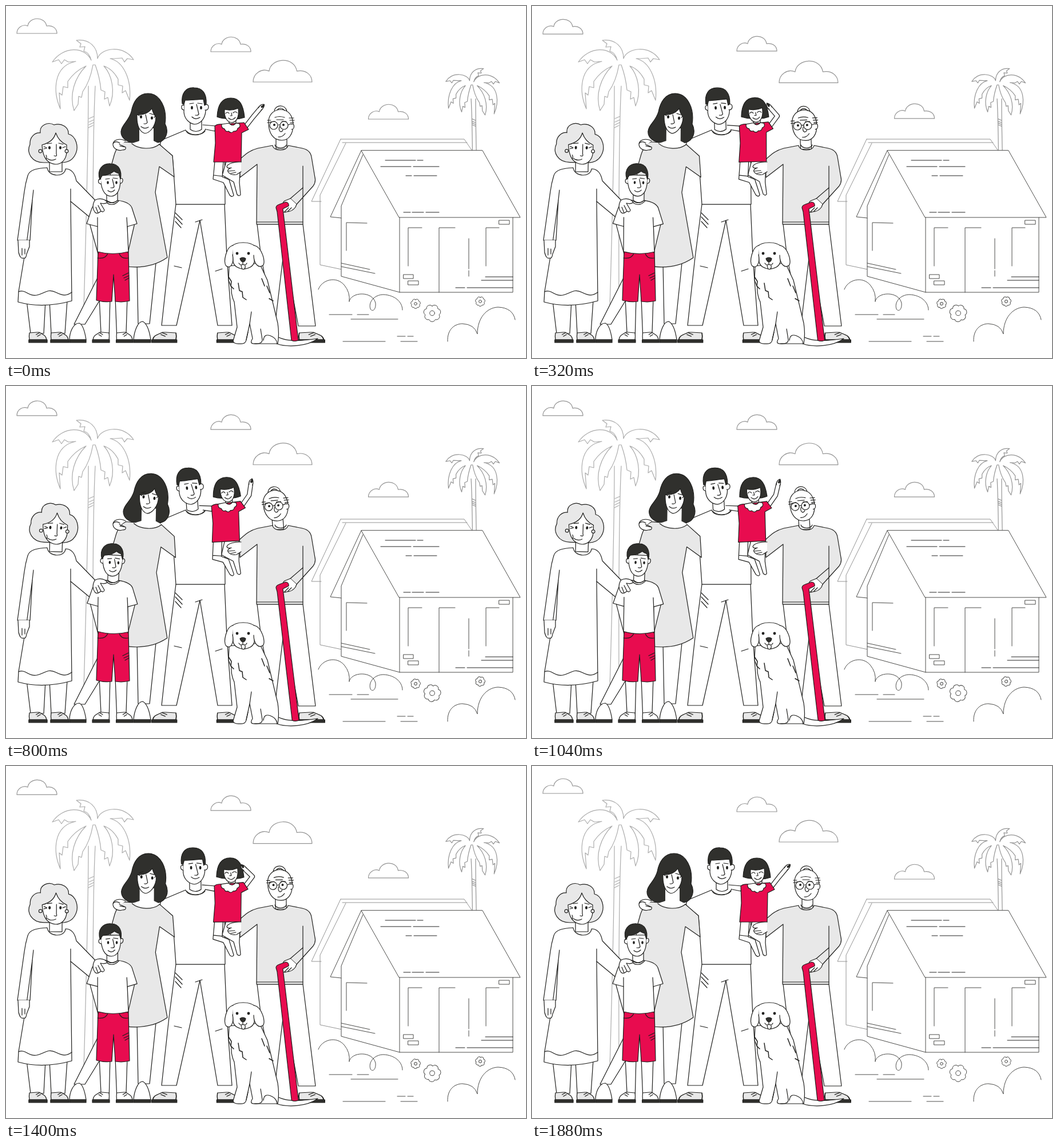
Animation, 909 px wide and 616 px high, one loop 1920 ms. Source, as an HTML page:

```html
<!DOCTYPE html>
<html lang="en">
<head>
<meta charset="utf-8">
<title>Family</title>
<style>
html, body { margin: 0; width: 100%; height: 100%; overflow: hidden; background: #fff; }
svg { display: block; width: 100%; height: 100%; fill: none; stroke: #1f1f1d; stroke-width: 1.2; stroke-linejoin: round; stroke-linecap: round; }
.pale { stroke: #acacac; }
.haze { stroke: #949494; }
.mid { stroke: #4c4c4a; stroke-width: 1; }
.w { fill: #fff; }
.g { fill: #e8e8e8; }
.d { fill: #30302d; }
.r { fill: #e80c4f; }
.dot { fill: #1f1f1d; stroke: none; }
</style>
</head>
<body>
<svg viewBox="0 0 909 616">
<defs>
  <path id="cloud" vector-effect="non-scaling-stroke" d="M0 0C0-10 10-17 19-13C21-29 49-31 52-13C62-15 70-9 70 0Z"/>
  <g id="palm">
    <path vector-effect="non-scaling-stroke" d="M144 140Q144 250 136 528M156 140Q151 230 152 520M145 197L154 193M145 203L154 199M145 208L153 204M144 213L152 209"/>
    <path class="w" vector-effect="non-scaling-stroke" d="M123 60C146 57 160 72 160 92C165 74 205 66 223 94L212 92L207 98L203 91L190 92L182 92C205 97 220 128 216 165L209 148L203 152L204 140L196 138L196 128C189 115 180 108 171 105C185 120 192 150 181 175L178 160L172 163L173 150L166 147Q164 125 156 103L152 103Q147 132 134 150L132 160L127 158L126 172L119 183C110 155 120 125 140 105Q120 114 108 132L108 143L100 141L98 156L93 152L95 180C82 150 82 105 122 97L109 98L102 94L97 101L92 94L81 98C100 70 138 70 149 95Q146 82 136 79L138 71L129 72L131 66Z"/>
  </g>
  <g id="shoe">
    <path d="M1 24C2 16 7 15 13 11L17 11L29 12Q30 18 29 24Z"/>
    <path class="d" d="M0 24H30V29H0Z"/>
    <path d="M13 12L18 15M11 15L16 18"/>
  </g>
</defs>

<use href="#palm" class="pale"/>
<use href="#palm" class="haze" transform="translate(916 70) scale(-.66 .66)"/>
<g id="clouds" class="haze"></g>

<g class="mid">
  <path class="w haze" d="M585 233H801L816 255M585 233L534 342H551M594 240L549 331V453L587 461M588 239H806"/>
  <path class="w" d="M621 253L567 369L586 371V473L688 501H886V370H899L833 253Z"/>
  <path d="M621 253L687 370H886M688 370V501M624 260L586 350V371M757 501V388H785M809 407V460M809 463V473M839 455V388H862M703 455V388H727M595 428V379L631 380M586 450L636 461M586 456L645 468"/>
  <path d="M862 375h18v7h-18ZM695 470h17v7h-17ZM703 481h18v7h-18Z"/>
  <path stroke="#222" d="M663 270H716M719 270H729M655 281H708M712 281H757M699 297H709M713 297H753M695 361H707M710 361H730M734 361H757M838 474H886M831 480H886M786 493H802M806 493H886"/>
  <path d="M565 540H605M614 540H634M603 548H685M589 587H663M684 578H698M702 578H712M690 587H719"/>
  <path d="M546 496C552 479 577 472 591 488Q602 501 600 517M600 517C603 500 641 498 646 520C647 532 640 536 637 530C633 518 644 505 660 505C680 506 693 518 693 532M772 587C771 565 785 556 798 556Q819 557 824 574C824 546 840 528 860 527Q886 528 890 549"/>
  <g id="flowers"></g>
</g>

<!-- grandfather -->
<path class="w" d="M439 382L446 440L470 560L486 425L511 560H541L519 382Z"/>
<use href="#shoe" class="g" transform="translate(557 560) scale(-1.53 1)"/>
<g id="oldHead">
  <path class="w" d="M472 226V250H491V226"/>
  <path class="w" d="M459 205C458 191 467 182 480 181C494 182 501 191 502 207C502 225 494 235 482 235C467 235 459 222 459 205ZM469 183C472 172 488 172 491 184M474 182Q480 175 487 183"/>
  <path class="w" d="M499 207C505 204 505 216 499 216"/>
  <path d="M470 195Q478 192 487 195M473 199H485M495 196H503M496 200H504M497 204H503M457 200H463M457 204H462M476 208L479 208M493 208L499 206M478 211Q476 218 480 220Q483 220 484 217M476 229Q483 230 488 223M462 203L470 202M482 202L490 202"/>
  <circle cx="468" cy="209" r="7"/><circle cx="486" cy="209" r="7"/>
  <circle class="dot" cx="469" cy="208" r="2"/><circle class="dot" cx="485" cy="208" r="2"/>
</g>
<path class="g" d="M466 244L440 249C425 253 418 260 408 269L409 300L439 277L438 382H519V318L497 337L508 347L537 315Q542 308 540 300L534 264Q532 252 518 249L493 244C491 255 468 255 466 244Z"/>
<path d="M438 378H519M519 280V318M470 243C472 250 488 250 490 243"/>

<!-- father -->
<path class="w" d="M297 347L285 440L272 559H298L339 375L370 559H395L386 440L382 347Z"/>
<path d="M331 378L343 374M296 362L308 374M296 369L308 382M296 377L306 388M294 455L307 458M366 464L378 460"/>
<use href="#shoe" class="g" transform="translate(255 560) scale(1.45 1)"/>
<use href="#shoe" class="g" transform="translate(406 560) scale(-1.25 1)"/>
<path class="w" d="M314 217L276 233Q268 237 270 245L291 262L297 347H383L382 222Q370 216 349 215C344 229 318 229 314 217Z"/>
<g id="dadHead">
  <path class="w" d="M322 200V216Q332 223 342 216V200"/>
  <path class="w" d="M311 164V186C312 199 322 206 330 207C341 206 348 196 349 184V163Z"/>
  <path class="w" d="M348 173C356 169 356 184 348 182M311 174C306 171 305 181 311 182"/>
  <path class="d" d="M308 171C306 153 314 142 329 143C344 143 351 154 350 171L347 174L345 163C333 164 320 165 313 165L311 172Z"/>
  <path d="M321 171L328 170M335 170L343 171M333 172L337 189Q336 192 331 191M325 194Q331 200 339 195"/>
  <ellipse class="dot" cx="325" cy="178" rx="1.9" ry="3"/><ellipse class="dot" cx="341" cy="178" rx="1.9" ry="3"/>
</g>
<path d="M316 219C322 227 342 227 348 219"/>

<!-- mother -->
<path class="w" d="M163 470L119 557H138L170 505M229 450L231 556H251L262 450"/>
<g class="w">
  <path d="M111 584C111 572 117 555 128 555Q136 558 140 584ZM223 584C224 570 230 552 239 552Q249 557 253 584Z"/>
  <path class="d" d="M111 584H140V589H111ZM223 584H253V589H223Z"/>
</g>
<g id="mom">
  <path class="g" d="M206 238Q193 244 188 265L181 290L192 330L197 380L190 452Q245 466 282 440L261 326L268 281L294 299L291 262L268 242Z"/>
  <path class="d" d="M248 153C231 153 222 168 219 185C214 203 202 207 201 220C201 231 210 237 220 239H266C281 235 285 219 278 206C282 180 270 153 248 153Z"/>
  <path class="w" stroke="none" d="M233 214V236Q225 239 220 240C232 251 256 252 268 241L258 236V214Z"/>
  <path d="M220 241C232 251 256 252 268 242"/>
  <path class="w" d="M229 190C240 191 250 187 255 179Q257 188 262 194C262 211 251 222 243 223C234 221 228 209 229 190Z"/>
  <path d="M232 187L239 185M251 188L258 190M244 190L247 204Q245 207 241 206M236 211Q242 216 249 212M233 192L230 190M259 195L261 193"/>
  <ellipse class="dot" cx="236" cy="194" rx="2" ry="2.8"/><ellipse class="dot" cx="255" cy="196" rx="2" ry="2.8"/>
</g>
<path class="w" d="M209 236C198 230 186 235 187 243C188 250 196 254 203 252Q211 252 209 247L199 245M209 247L198 242M187 241Q191 235 199 240"/>

<!-- grandmother -->
<path class="w" d="M36 515L43 573H66L69 515M76 515L79 573H103L107 515"/>
<use href="#shoe" class="g" transform="translate(72 560) scale(-1.07 1)"/>
<use href="#shoe" class="g" transform="translate(110 560) scale(-1.07 1)"/>
<g id="granHead">
  <path class="g" d="M60 222C58 208 74 202 84 208C97 204 110 212 109 224C122 227 129 247 120 262Q113 274 97 274H66C45 274 35 257 42 242C41 230 50 221 60 222Z"/>
  <path class="w" d="M76 262V290H98V262"/>
  <path class="w" d="M63 243C75 240 84 234 87 222C91 234 99 240 106 243V256C105 271 95 277 87 277C74 276 64 267 63 243Z"/>
  <circle class="w" cx="60" cy="254" r="2.8"/><circle class="w" cx="106" cy="254" r="2.8"/>
  <path d="M72 241L80 240M92 240L100 242M88 242V259Q90 264 84 262M72 267Q79 272 87 268M66 246L71 248M66 250L71 249M99 248L104 246M70 261Q72 265 70 268"/>
  <ellipse class="dot" cx="76" cy="248" rx="2" ry="2.8"/><ellipse class="dot" cx="95" cy="248" rx="2" ry="2.8"/>
</g>
<path class="w" d="M72 283C55 284 41 286 38 297Q34 310 32 325L20 410H42L46 340L36 415L22 500L21 518Q65 530 115 516L113 342L148 371L156 340L123 306Q119 285 104 285C103 300 74 300 72 283Z"/>
<path d="M46 340L48 322M113 342V320M22 500C34 495 40 509 54 506S73 494 87 501S106 507 115 501"/>
<path class="w" d="M21 410L22 431Q25 443 30 441Q35 443 36 434L41 421V410M28 424V436M33 425V434"/>

<!-- boy -->
<path class="w" d="M163 510L166 572L180 586L182 510M191 510L194 586L210 572L212 510"/>
<use href="#shoe" class="w" transform="translate(151 560)"/>
<use href="#shoe" class="w" transform="translate(222 560) scale(-.98 1)"/>
<path class="r" d="M161 429L158 515Q172 519 185 517L188 470L191 517Q204 519 216 516L214 429Z"/>
<path d="M160 441Q174 443 178 433M214 441Q201 443 198 433M204 472L214 467M206 476L215 472M208 480L215 476"/>
<g id="boy">
  <path class="w" d="M146 380L161 434L162 384M225 380L213 432L212 384"/>
  <path class="w" d="M174 340Q152 344 149 357L141 381L160 386V430Q187 437 214 430L212 386L229 381L220 353Q216 343 195 340Q185 349 174 340Z"/>
  <path d="M160 386V370M212 386L211 370M172 341Q185 354 197 341"/>
  <g id="boyHead">
    <path class="w" d="M176 325V340Q185 348 195 340V325"/>
    <path class="w" d="M165 296C165 320 172 333 184 333C196 332 201 318 200 296Z"/>
    <path class="w" d="M166 303C160 301 160 312 166 311M200 302C206 299 205 311 200 310"/>
    <path class="d" d="M164 304C158 286 169 275 183 276C198 276 203 290 200 303L197 293Q191 291 189 289Q180 296 168 297Z"/>
    <path d="M174 303L181 302M187 301L195 302M186 303L189 316Q188 319 183 318M178 323Q184 328 190 322"/>
    <ellipse class="dot" cx="178" cy="309" rx="1.8" ry="2.7"/><ellipse class="dot" cx="193" cy="309" rx="1.8" ry="2.7"/>
  </g>
</g>
<path class="w" d="M155 340C164 335 174 338 177 344Q172 347 165 345L172 357Q171 362 166 359L162 362Q157 364 155 360Q149 352 155 340M166 359L161 349M161 362L157 352"/>

<!-- girl -->
<g id="girl">
  <path class="w" d="M344 208L367 210L365 219L350 216"/>
  <path class="w" d="M378 296L398 308L404 330Q408 334 410 330L408 309L410 272H385Z"/>
  <path class="w" d="M365 272L362 303L380 309L391 331Q396 336 398 331L390 304L378 299L380 272ZM363 296L378 298"/>
  <path class="w" d="M390 200V207Q396 214 402 207V200"/>
  <path class="d" d="M369 194C370 171 378 161 393 161C409 161 415 174 417 195Q406 199 393 197Q380 198 369 194Z"/>
  <path class="w" d="M382 181Q394 184 406 179C408 196 402 204 394 204C386 203 381 194 382 181Z"/>
  <path d="M384 188Q387 184 390 188M397 187Q401 183 404 187M394 187L395 192L392 192M389 196Q395 202 401 195"/>
  <path id="armEdge" stroke-width="8.4"/>
  <path id="armSkin" stroke-width="6" style="stroke:#fff"/>
  <g id="hand"><path class="w" d="M-3 2C-4-3-3-7 1-9C4-5 4-1 3 2"/><path class="d" d="M-1-3L1-9L3-5L1-2Z"/></g>
  <path class="r" d="M379 207Q369 206 365 210L366 240L363 273H411L412 222L424 216L416 204Z"/>
  <path class="w" d="M377 207Q376 214 382 215Q384 221 389 219Q394 224 398 219Q404 220 405 214Q411 212 408 206L402 205Q396 212 390 205Z"/>
</g>
<path class="w" d="M411 273C400 272 387 276 386 281Q387 285 394 283Q386 286 388 290Q393 297 403 295L411 290M389 289L400 288M393 293L402 291"/>

<!-- dog -->
<path class="w" d="M472 577C490 590 525 585 545 582C525 597 490 597 473 591"/>
<path class="w" d="M390 455L389 480L394 492Q393 505 399 518L404 562L397 586Q398 592 409 591Q419 592 420 584L426 556L431 582Q425 591 434 591H475Q478 574 475 555L463 505L457 480L443 450Z"/>
<path stroke-width="1.5" d="M389 474L394 482L393 490L398 495M406 485L408 498L413 500L414 510L420 514M447 477L452 490M456 490L461 502M460 512L467 516"/>
<path d="M426 556L429 535M420 584L423 571M450 585Q451 573 462 577Q473 581 474 591M434 591Q448 592 448 584L445 565"/>
<path class="w" d="M395 420C404 412 425 412 435 420L434 448C430 464 401 464 397 448Z"/>
<path class="w" d="M396 419C385 422 379 448 385 455C393 461 399 449 396 435M434 419C447 422 455 448 449 454C440 460 433 449 433 436"/>
<circle class="dot" cx="404" cy="433" r="2.4"/><circle class="dot" cx="424" cy="433" r="2.4"/>
<path class="d" d="M409 442Q414 438 419 442Q418 448 414 448Q410 447 409 442Z"/>
<path d="M414 448V452M407 450Q410 455 414 452Q419 455 421 450"/>
<path class="w" d="M411 454Q412 461 415 461Q419 460 418 454"/>

<path class="w" d="M497 337L487 341Q482 345 486 350L481 356Q484 363 491 360Q500 360 506 352L508 347M487 360L494 353M492 360L499 353"/>
<path id="cane" class="r" d="M474 360L472 353Q472 349 478 347L489 343Q495 344 494 350L484 355L511 585Q504 588 499 585Z"/>
</svg>
<script>
const LOOP = 1920, FRAME = 40;
const $ = id => document.getElementById(id);
const rad = deg => deg * Math.PI / 180;
const clamp = v => Math.max(0, Math.min(1, v));
const ease = v => (1 - Math.cos(Math.PI * clamp(v))) / 2;

// x, base y, scale, drift
const clouds = [[19, 48, 1, 4], [358, 80, 1, -4], [432, 133, 1.47, 5], [633.5, 198, 1, -4]];
$('clouds').innerHTML = clouds.map(() => '<use href="#cloud" class="w"/>').join('');

// x, y, radius
const flowers = [[716, 521, 9], [745, 537.5, 16], [829, 517, 9]];
function flowerShape([, , r]) {
  const petals = 7;
  const at = i => {
    const a = i * 2 * Math.PI / petals;
    return `${(r * .78 * Math.sin(a)).toFixed(2)} ${(-r * .78 * Math.cos(a)).toFixed(2)}`;
  };
  let d = 'M' + at(0);
  for (let i = 1; i <= petals; i++) d += `A${r * .36} ${r * .36} 0 0 1 ${at(i)}`;
  return `<g><path class="w" d="${d}Z"/><circle r="${r * .27}"/></g>`;
}
$('flowers').innerHTML = flowers.map(flowerShape).join('');

// Each part leans by an angle about a pivot, plus a shift.
const leaning = {
  granHead: [2, 87, 290], mom: [1.1, 235, 430], boy: [1, 187, 430], boyHead: [2, 185, 345],
  dadHead: [-4, 332, 245, -4, 0], girl: [-3, 388, 285, -2, -1],
  oldHead: [-5, 481, 265, -4, 1], cane: [-.3, 484, 350]
};

const wave = [[0, 40], [300, -40], [440, -48], [620, -30], [800, 8], [940, 40]];
function track(keys, t) {
  const i = keys.findIndex(k => k[0] >= t);
  if (i < 1) return keys[0][1];
  const [t0, a] = keys[i - 1], [t1, b] = keys[i];
  return a + (b - a) * (t - t0) / (t1 - t0);
}

function draw(time) {
  const t = Math.floor(time % LOOP / FRAME) * FRAME;
  const drift = (1 - Math.cos(2 * Math.PI * t / (LOOP - FRAME))) / 2;
  const lean = t < 900 ? ease(t / 680) : 1 - ease((t - 900) / 680);

  clouds.forEach(([x, y, s, dy], i) =>
    $('clouds').children[i].setAttribute('transform', `translate(${x} ${y + dy * drift}) scale(${s})`));
  flowers.forEach(([x, y], i) =>
    $('flowers').children[i].setAttribute('transform', `translate(${x} ${y}) rotate(${8 * drift})`));
  for (const id in leaning) {
    const [a, x, y, dx = 0, dy = 0] = leaning[id];
    $(id).setAttribute('transform', `translate(${dx * lean} ${dy * lean}) rotate(${a * lean} ${x} ${y})`);
  }

  const angle = track(wave, t % 940) + 3 * lean;
  const x = 432 + 20 * Math.sin(rad(angle)), y = 194 - 20 * Math.cos(rad(angle));
  for (const id of ['armEdge', 'armSkin']) $(id).setAttribute('d', `M418 212L432 194L${x} ${y}`);
  $('hand').setAttribute('transform', `translate(${x} ${y}) rotate(${angle})`);
}

function loop() {
  draw(performance.now());
  requestAnimationFrame(loop);
}
loop();
</script>
</body>
</html>
```
